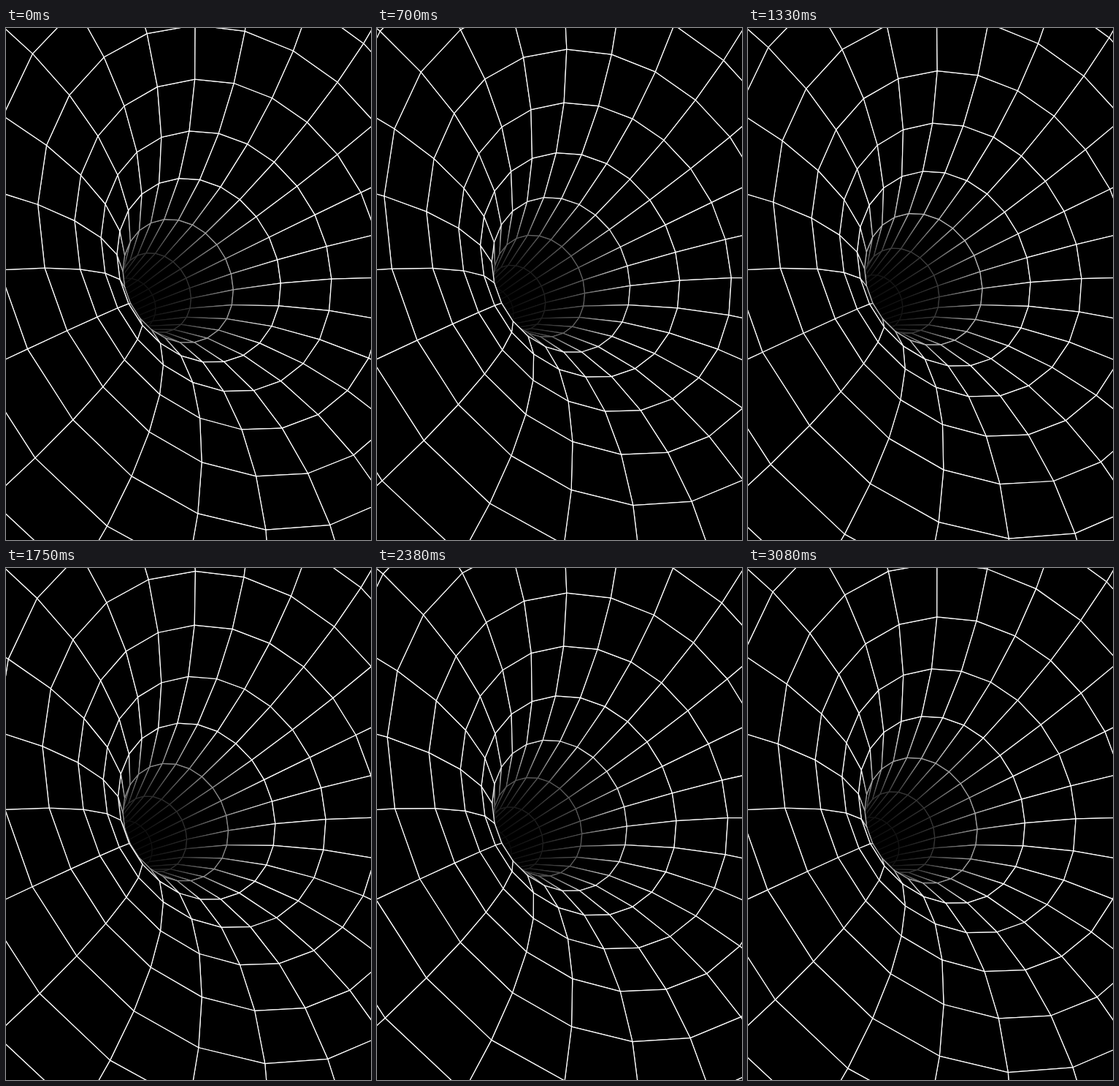
Write an HTML page with a canvas that moves like this. It is 500x700 px and loops after 3.15 s.

```html
<!DOCTYPE html>
<html lang="en">
<head>
<meta charset="utf-8">
<title>Wireframe tunnel</title>
<style>
  html, body { margin: 0; width: 100%; height: 100%; overflow: hidden; background: #000; }
  canvas { display: block; }
</style>
</head>
<body>
<canvas id="stage" width="500" height="700"></canvas>
<script>
const ctx = document.getElementById('stage').getContext('2d');
const RAD = Math.PI / 180;

// The tunnel is the hole of a torus, 36 rings around the tube and 24 spokes.
const SPOKES = 24, STEP = 70, FRAMES = 45, FRAMES_PER_RING = 22.5;
const TUBE = 429, HOLE = 35, FOCUS = 2300;
const FIRST = -7, LAST = 7;
const AXIS = [0.895, -0.44], SIDE = [-0.446, -0.896];
const TILT_COS = 0.8, TILT_SIN = 0.605;
const EYE = [325, 328], ORIGIN = [317.4, 304.4];

// s counts rings inwards, k counts spokes clockwise.
function project(s, k) {
  const a = (60 - 10 * s) * RAD;
  const phi = (15 * (k + 1) + 0.4) * RAD;
  const radius = HOLE + TUBE * (1 - Math.cos(a));
  const along = TUBE * (Math.sin(a) - Math.sin(60 * RAD));
  const across = radius * Math.cos(phi), up = radius * Math.sin(phi);
  const shift = TILT_COS * up + TILT_SIN * along;
  const scale = 1 / (1 + (TILT_SIN * up - TILT_COS * along) / FOCUS);
  return [0, 1].map(i =>
    EYE[i] + (ORIGIN[i] - EYE[i] + AXIS[i] * shift + SIDE[i] * across) * scale);
}

function shade(s) {
  const d = Math.max(0, s - 2) / 1.2;
  const v = Math.round(255 * Math.max(0, 1.01 / (1 + d ** 2.6) - 0.01));
  return `rgb(${v},${v},${v})`;
}

function line(p, q, style) {
  ctx.strokeStyle = style;
  ctx.beginPath();
  ctx.moveTo(...p);
  ctx.lineTo(...q);
  ctx.stroke();
}

function spoke(p, q, from, to) {
  if (from === to) return line(p, q, from);
  const fade = ctx.createLinearGradient(...p, ...q);
  fade.addColorStop(0, from);
  fade.addColorStop(1, to);
  line(p, q, fade);
}

function draw(frame) {
  const phase = (frame / FRAMES_PER_RING) % 1;
  ctx.fillStyle = '#000';
  ctx.fillRect(0, 0, 500, 700);
  ctx.lineWidth = 1.25;
  ctx.lineCap = 'round';

  const ring = s => Array.from({ length: SPOKES }, (_, k) => project(s, k));
  let inner = ring(LAST + phase);

  // Deep bands first, so that nearer ones hide them.
  for (let i = LAST - 1; i >= FIRST; i--) {
    const s = i + phase;
    const outer = ring(s);
    const near = shade(s), far = shade(s + 1);
    for (let n = 0; n < SPOKES; n++) {
      const k = (n + 5) % SPOKES, j = (k + 1) % SPOKES;
      ctx.beginPath();
      ctx.moveTo(...outer[k]);
      ctx.lineTo(...outer[j]);
      ctx.lineTo(...inner[j]);
      ctx.lineTo(...inner[k]);
      ctx.fill();
      line(inner[k], inner[j], far);
      line(outer[k], outer[j], near);
      spoke(outer[k], inner[k], near, far);
      spoke(outer[j], inner[j], near, far);
    }
    inner = outer;
  }
}

const start = performance.now();
let shown = -1;
function tick() {
  const frame = Math.floor((performance.now() - start) / STEP) % FRAMES;
  if (frame !== shown) draw(shown = frame);
  requestAnimationFrame(tick);
}
tick();
</script>
</body>
</html>
```
